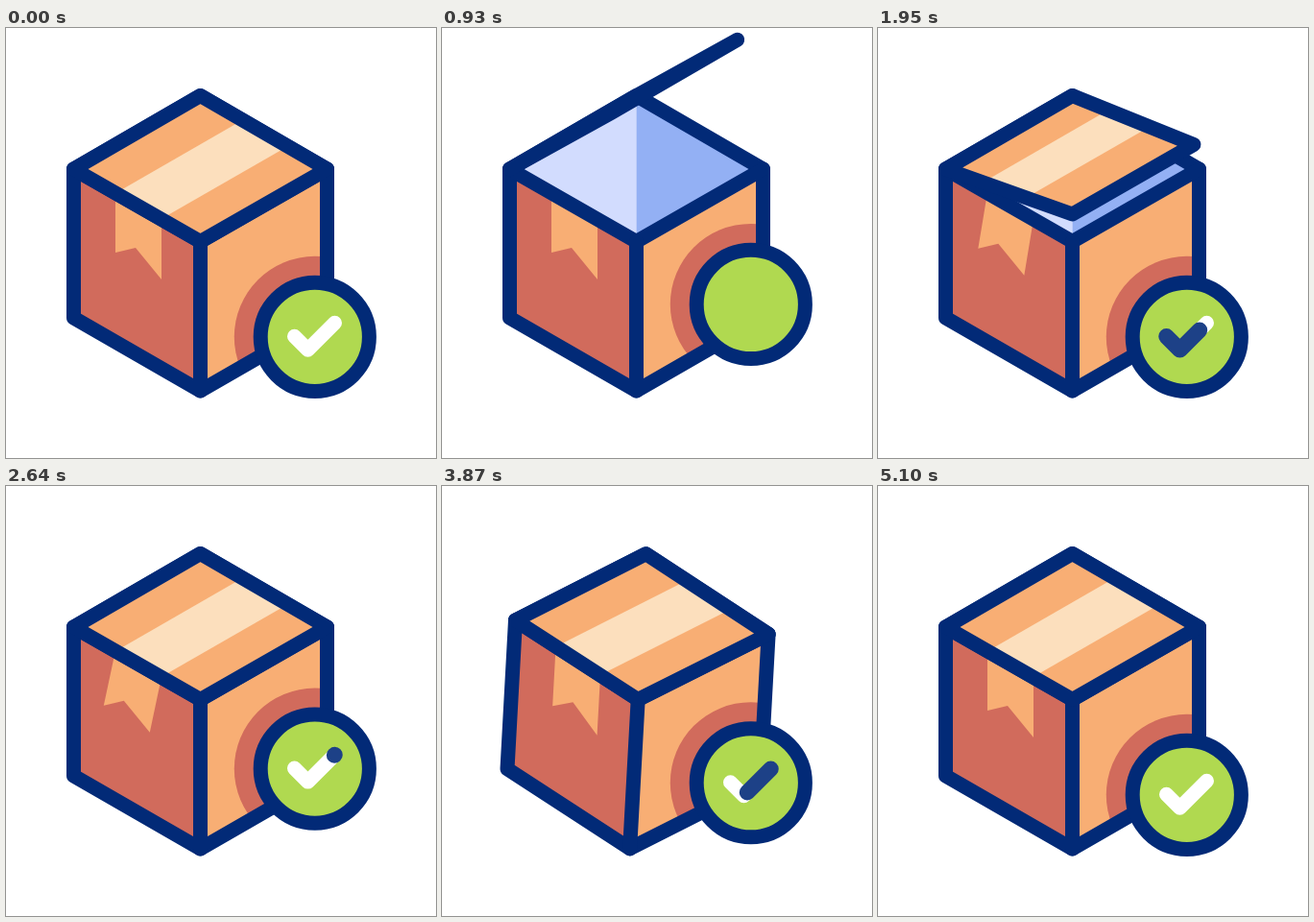
Animation, 448 px wide and 448 px high, one loop 5.4 s. Source, as an HTML page with a canvas:

```html
<!DOCTYPE html>
<html lang="en">
<head>
<meta charset="utf-8">
<title>Parcel ready</title>
<style>
  html, body { margin: 0; width: 100%; height: 100%; overflow: hidden; background: #fff; }
  canvas { display: block; width: 448px; height: 448px; }
</style>
</head>
<body>
<canvas id="stage" width="448" height="448"></canvas>
<script>
const ctx = document.getElementById('stage').getContext('2d');
const LOOP = 5400, MOVE_END = 5100, STEP = 30, LINE = 15;
const NAVY = '#022a77', ORANGE = '#f8ae74', RED = '#d16b5c', TAPE = '#fcdfbd',
      GREEN = '#b0d950', PALE = '#d2dcfe', BLUE = '#93b0f4', INK = '#1d4187';

const top_ = [202.5, 70.5], left = [70.5, 147], right = [334.5, 147], front = [202.5, 222.5],
      lowLeft = [70.5, 302], lowRight = [334.5, 302], bottom = [202.5, 378];
const check = [[-21.3, -0.5], [-7.3, 13.5], [20.7, -14.5]];
const pivot = [202.5, 253];
const badgeX = 321.8;

const mix = (a, b, k) => a + (b - a) * k;
const between = (p, q, k) => [mix(p[0], q[0], k), mix(p[1], q[1], k)];
const ease = (t, start, end) => {
  const k = Math.min(1, Math.max(0, (t - start) / (end - start)));
  return k * k * (3 - 2 * k);
};

// Eased value through keys of [time, v1, v2, ...]
function track(t, keys) {
  let i = 0;
  while (i < keys.length - 2 && t >= keys[i + 1][0]) i++;
  const [t0, ...a] = keys[i], [t1, ...b] = keys[i + 1];
  const k = ease(t, t0, t1);
  return a.map((v, n) => mix(v, b[n], k));
}

function trace(points, closed = true) {
  ctx.beginPath();
  points.forEach(p => ctx.lineTo(...p));
  if (closed) ctx.closePath();
}
function fill(points, color) {
  trace(points);
  ctx.fillStyle = color;
  ctx.fill();
}
function stroke(points, color = NAVY, width = LINE, closed = false) {
  trace(points, closed);
  ctx.strokeStyle = color;
  ctx.lineWidth = width;
  ctx.stroke();
}

const LIFT = [[0, 0], [120, 0], [900, 34], [1690, 0], [2120, 0], [2850, 34], [3590, 0], [4270, 34], [5100, 0]];

// Right corner x, y, front corner x, y, and the tape's two edges across the lid
const LID = [
  [0, 334.5, 147, 202.5, 222.5, .332, .69],
  [880, 306, 10, 174, 86.5, .295, .635],
  [1500, 397, 132, 265, 207, .295, .635],
  [1710, 397, 132, 265, 207, .295, .635],
  [1950, 329, 121.5, 202.5, 194, .295, .635],
  [2260, 334.5, 147, 202.5, 222.5, .332, .69]
];

const FLAP = [[0, 0], [1400, 0], [2350, 1.12], [3300, 0], [5400, 0]];

function tilt(t) {
  const inside = t > 3150 && t < 4650;
  return inside ? 3.3 * Math.PI / 180 * Math.sin((t - 3150) / 300 * Math.PI) : 0;
}

function drawLid(t) {
  const [rx, ry, fx, fy, tapeFrom, tapeTo] = track(t, LID);
  const r = [rx, ry], f = [fx, fy];
  const quad = [top_, r, f, left];
  fill(quad, ORANGE);
  fill([between(top_, r, tapeFrom), between(top_, r, tapeTo),
        between(left, f, tapeTo), between(left, f, tapeFrom)], TAPE);
  stroke(quad, NAVY, LINE, true);
}

function drawBox(t, badgeY) {
  const angle = tilt(t);
  const turn = a => {
    ctx.translate(...pivot);
    ctx.rotate(a);
    ctx.translate(-pivot[0], -pivot[1]);
  };
  ctx.save();
  turn(angle);
  fill([left, front, bottom, lowLeft], RED);

  const [swing] = track(t, FLAP);
  const hang = (x, y) => [x - 14 * swing, y - 6 * swing];
  fill([[114, 171.5], [162, 199], hang(162, 262), hang(135, 229), hang(114, 234)], ORANGE);

  const side = [right, front, bottom, lowRight];
  fill(side, ORANGE);
  ctx.save();
  trace(side);
  ctx.clip();
  turn(-angle);
  ctx.beginPath();
  ctx.arc(badgeX, badgeY, 84, 0, 7);
  ctx.fillStyle = RED;
  ctx.fill();
  ctx.restore();

  fill([top_, front, left], PALE);
  fill([top_, right, front], BLUE);
  stroke([top_, right, lowRight, bottom, lowLeft, left], NAVY, LINE, true);
  stroke([left, front, right]);
  stroke([front, bottom]);
  drawLid(t);
  ctx.restore();
}

function drawCheck(from, to, color, width) {
  if (to <= 0 || from >= 1 || to <= from) return;
  const corner = 1 / 3;
  const at = k => k < corner
    ? between(check[0], check[1], k / corner)
    : between(check[1], check[2], (k - corner) / (1 - corner));
  const points = [at(from)];
  if (from < corner && to > corner) points.push(check[1]);
  const end = at(to);
  points.push([end[0] + .01, end[1]]);
  stroke(points, color, width);
}

function drawBadge(t, y) {
  ctx.save();
  ctx.translate(badgeX, y);
  ctx.beginPath();
  ctx.arc(0, 0, 56.6, 0, 7);
  ctx.fillStyle = GREEN;
  ctx.fill();
  ctx.strokeStyle = NAVY;
  ctx.lineWidth = LINE;
  ctx.stroke();

  if (t < 800) drawCheck(ease(t, 0, 570), 1, '#fff', 15);
  else drawCheck(0, ease(t, 1000, 1540), '#fff', 15);
  for (const start of [1556, 3056]) {
    drawCheck(ease(t, start + 574, start + 1114), ease(t, start, start + 540), INK, 16.5);
  }
  ctx.restore();
}

function frame(now) {
  const t = Math.min(MOVE_END, Math.floor(now % LOOP / STEP) * STEP);
  const badgeY = 321.8 - track(t, LIFT)[0];
  ctx.fillStyle = '#fff';
  ctx.fillRect(0, 0, 448, 448);
  ctx.lineCap = ctx.lineJoin = 'round';
  drawBox(t, badgeY);
  drawBadge(t, badgeY);
}

let origin;
function tick(now) {
  origin ??= now;
  frame(now - origin);
  requestAnimationFrame(tick);
}
frame(0);
requestAnimationFrame(tick);
</script>
</body>
</html>
```
